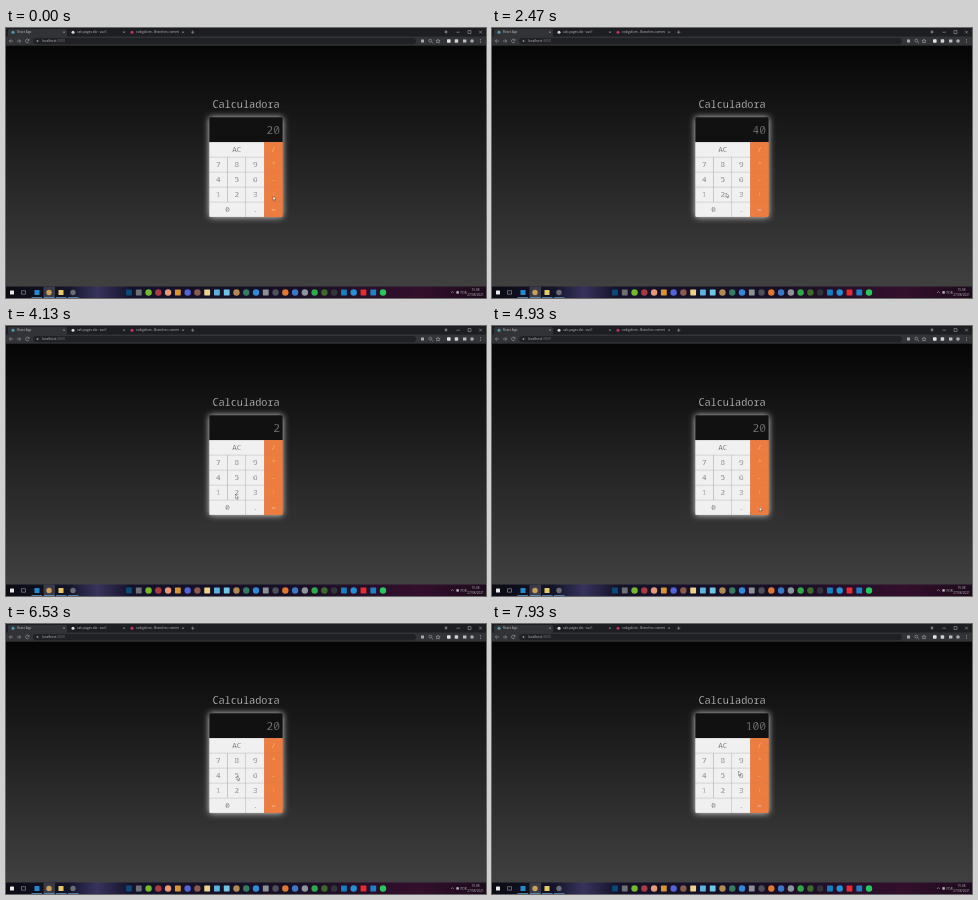
An HTML page for the animation above (8000 ms loop, 480 by 270 pixels).

```html
<!DOCTYPE html>
<html lang="pt">
<head>
<meta charset="utf-8">
<title>Calculadora</title>
<style>
  html, body { margin: 0; width: 100%; height: 100%; overflow: hidden; background: #000; }
  svg { display: block; width: 100vw; height: 100vh; }
  text { font-family: "Open Sans", sans-serif; font-size: 3.4px; fill: #b9bbbf; }
  .small { font-size: 3.1px; }
  /* A stroke in the background colour thins the letters. */
  .mono { font-family: "Noto Sans Mono", monospace; stroke-width: .3; }
  .title { font-size: 10.2px; fill: #f2f2f2; stroke: #141414; }
  .screen { font-size: 11.2px; fill: #b8b8b8; stroke: #111; stroke-width: .4; }
  .key { font-size: 7.6px; fill: #333; stroke: #f0f0f0; }
  .op { fill: #ffdcc6; stroke: #ed7c40; }
  .dim { fill: #77797d; }
  .line { fill: none; stroke: #b4b4b4; stroke-width: .5; }
</style>
</head>
<body>
<svg id="stage" viewBox="0 0 480 270">
  <defs>
    <linearGradient id="page" x1="0" y1="0" x2="0" y2="1">
      <stop stop-color="#010101"/><stop offset="1" stop-color="#434343"/>
    </linearGradient>
    <linearGradient id="bar">
      <stop stop-color="#0b0b14"/><stop offset=".13" stop-color="#14142a"/>
      <stop offset=".19" stop-color="#37335c"/><stop offset=".26" stop-color="#14122a"/>
      <stop offset=".6" stop-color="#180f26"/><stop offset=".86" stop-color="#330f2c"/>
      <stop offset="1" stop-color="#1d0b1c"/>
    </linearGradient>
    <filter id="glow" x="-30%" y="-30%" width="160%" height="160%">
      <feGaussianBlur stdDeviation="3.1"/>
    </filter>
    <clipPath id="body"><rect x="203.2" y="89.2" width="73.6" height="100" rx="1.6"/></clipPath>
  </defs>
  <rect width="480" height="270" fill="url(#page)"/>
  <g id="browser"></g>
  <text class="mono title" x="240" y="80" text-anchor="middle">Calculadora</text>
  <rect x="203.2" y="89.2" width="73.6" height="100" rx="1.6" fill="#d8d8d8" filter="url(#glow)"/>
  <g id="calculator" clip-path="url(#body)"></g>
  <text id="screen" class="mono screen" x="274" y="106.2" text-anchor="end">20</text>
  <g id="taskbar"></g>
  <path id="cursor" d="M0 0V4.3L1 3.4 1.7 5 2.4 4.7 1.7 3.1H3Z" fill="#fff" stroke="#222" stroke-width=".35"/>
</svg>
<script>
const $ = id => document.getElementById(id);
const rect = (x, y, w, h, fill, rx = 0) =>
  `<rect x="${x}" y="${y}" width="${w}" height="${h}" rx="${rx}" fill="${fill}"/>`;
const dot = (x, y, r, fill) => `<circle cx="${x}" cy="${y}" r="${r}" fill="${fill}"/>`;
const line = d => `<path class="line" d="${d}"/>`;
const label = (x, y, text, cls = '', anchor = 'start') =>
  `<text x="${x}" y="${y}" class="${cls}" text-anchor="${anchor}">${text}</text>`;

function drawBrowser() {
  const cross = (x, y, r) => line(`M${x - r} ${y - r}l${2 * r} ${2 * r}m0 ${-2 * r}l${-2 * r} ${2 * r}`);
  const tabs = [
    [7, 'React App', '#4e9db5'],
    [67, 'calc-pages.dio · vue1', '#d8d8d8'],
    [126, 'codigolivre - Branches: commi', '#c83261']
  ];
  let out = rect(0, 0, 480, 9, '#1d1e21') + rect(2, 1, 59, 8, '#323337', 1.5) +
    rect(0, 8.5, 480, 9.2, '#323337') + rect(27, 10, 383, 6.2, '#202124', 3.1);
  for (const [x, name, color] of tabs) {
    out += dot(x, 4.2, 1.5, color) + label(x + 4, 5.4, name, 'small') + cross(x + 51, 4.2, .8);
  }
  out += line('M185 4.2h3.4M186.7 2.5v3.4') + dot(440, 4, 1.4, '#777') +
    line('M450.5 4.2h3.4M462 2.6h3v3h-3z') + cross(474.5, 4.1, 1.4);
  out += line('M7 13H3.5M5 11.3L3.3 13 5 14.7') +
    line('M11 13h3.5M13 11.3l1.7 1.7-1.7 1.7') +
    line('M22.9 12A1.8 1.8 0 1 0 23 13.6M23 11v1.4h-1.4');
  out += dot(31.5, 13, 1, '#8a8c90') +
    label(36, 14.2, 'localhost<tspan class="dim">:3000</tspan>');
  out += rect(415, 11.5, 3, 3, '#a8a8a8') + line('M425.5 13.8l1.6 1.5') +
    '<circle class="line" cx="424.3" cy="12.6" r="1.4"/>' +
    line('M432 11l.6 1.4 1.5.1-1.1 1 .3 1.5-1.3-.8-1.3.8.3-1.5-1.1-1 1.5-.1z');
  out += rect(441, 11.2, 3.6, 3.6, '#e4e4e4', .7) + rect(448.7, 11.3, 3.5, 3.5, '#d0d0d0', .7) +
    rect(457, 11.5, 3.4, 3, '#bdbdbd') + dot(466, 13, 1.8, '#a5a9ad');
  out += [11.5, 13, 14.5].map(y => dot(474.5, y, .4, '#ccc')).join('');
  $('browser').innerHTML = out;
}

function drawCalculator() {
  const col = 18.4, row = 15, left = 203.2, top = 114.2;
  const keys = [
    ['AC', 0, 0, 3], ['/', 3, 0],
    ...[...'789*456-123+'].map((k, i) => [k, i % 4, 1 + Math.floor(i / 4)]),
    ['0', 0, 4, 2], ['.', 2, 4], ['=', 3, 4]
  ];
  let out = rect(left, 89, 73.6, 25.2, '#111');
  for (const [name, c, r, span = 1] of keys) {
    const x = left + c * col, y = top + r * row, w = span * col, op = c === 3;
    out += rect(x, y, w, row, op ? '#d9753f' : '#8c8c8c') +
      rect(x, y, w - .3, row - .3, op ? '#ed7c40' : '#f0f0f0') +
      label(x + w / 2, y + 10.1, name, 'mono key' + (op ? ' op' : ''), 'middle');
  }
  $('calculator').innerHTML = out;
}

function drawTaskbar() {
  const y = 264.5;
  const round = (x, color) => dot(x, y, 3.2, color);
  const square = (x, color, size = 5.8) =>
    rect(x - size / 2, y - size / 2, size, size, color, .6);
  const pinned = [
    's#0a4a78', 's#6d7074', 'o#72b92d', 'o#a83a42', 'o#e79a78', 's#d99532', 'o#5264d8',
    'o#8a5a4c', 's#ecd28a', 's#5cb4dc', 's#6cc6e4', 'o#b08a50', 'o#357a64', 'o#3289d8',
    's#8d9194', 'o#4c5058', 'o#e0762f', 'o#3a78c5', 'o#8d949c', 'o#30a848', 'o#3d6a2c',
    'o#33343a', 's#1580c0', 'o#2490d6', 's#e42c31', 's#1f7fc7', 'o#29c65b'
  ];
  let out = rect(0, 258.5, 480, 11.5, 'url(#bar)') + rect(37.5, 258.5, 11.5, 11.5, '#3b3b48');
  out += square(6, '#e8e8e8', 4) + line('M15.5 262.7h4v3.5h-4z');
  out += square(31, '#2389cd', 5) + dot(43, y, 2.7, '#c9a058') +
    square(55, '#e7c968', 5) + dot(67, y, 2.7, '#6a6c72');
  out += [25.5, 38, 50, 62].map(x => rect(x, 269.3, 10.5, .7, '#67a8d6')).join('');
  pinned.forEach((p, i) => {
    out += (p[0] === 'o' ? round : square)(123 + i * 9.77, p.slice(1));
  });
  out += line('M445 265l1.4-1.5 1.4 1.5') + rect(450.4, 263.2, 2.4, 2.4, '#bbb') +
    label(454.4, 265.6, 'POR', 'small');
  out += label(469.5, 263.4, '15:08', 'small', 'middle') +
    label(469.5, 268.2, '27/08/2021', 'small', 'middle');
  $('taskbar').innerHTML = out;
}

// time, x, y of the pointer tip
const path = [
  [0, 267, 168], [80, 267, 168], [420, 231, 168], [520, 231, 168], [780, 222, 181],
  [930, 222, 181], [1270, 283, 177], [1530, 268, 181], [1780, 268, 181], [2250, 236, 165],
  [2470, 234, 165], [2700, 234, 165], [3150, 267, 122], [3330, 267, 122], [3750, 230, 168],
  [4250, 229.5, 168.5], [4700, 267, 181], [5270, 268, 181], [5530, 267, 136],
  [5640, 267, 136], [5870, 239, 161], [6150, 231, 152], [6600, 231, 152],
  [7000, 270.5, 178.5], [7360, 270.5, 178.5], [7930, 246.5, 147], [8000, 246.5, 147]
];
const readings = [[0, '20'], [470, '2'], [850, '20'], [1650, '40'], [3850, '2'],
  [4850, '20'], [6540, '5'], [7080, '100']];

function pointer(t) {
  const i = path.findIndex(p => p[0] > t);
  const [t0, x0, y0] = path[i - 1], [t1, x1, y1] = path[i];
  const u = (t - t0) / (t1 - t0), e = u * u * (3 - 2 * u);
  return [x0 + (x1 - x0) * e, y0 + (y1 - y0) * e];
}

function render(now) {
  const t = now % 8000;
  $('cursor').setAttribute('transform', `translate(${pointer(t)})`);
  $('screen').textContent = readings.filter(r => r[0] <= t).pop()[1];
}

function tick() {
  render(performance.now());
  requestAnimationFrame(tick);
}

drawBrowser();
drawCalculator();
drawTaskbar();
tick();
</script>
</body>
</html>
```
